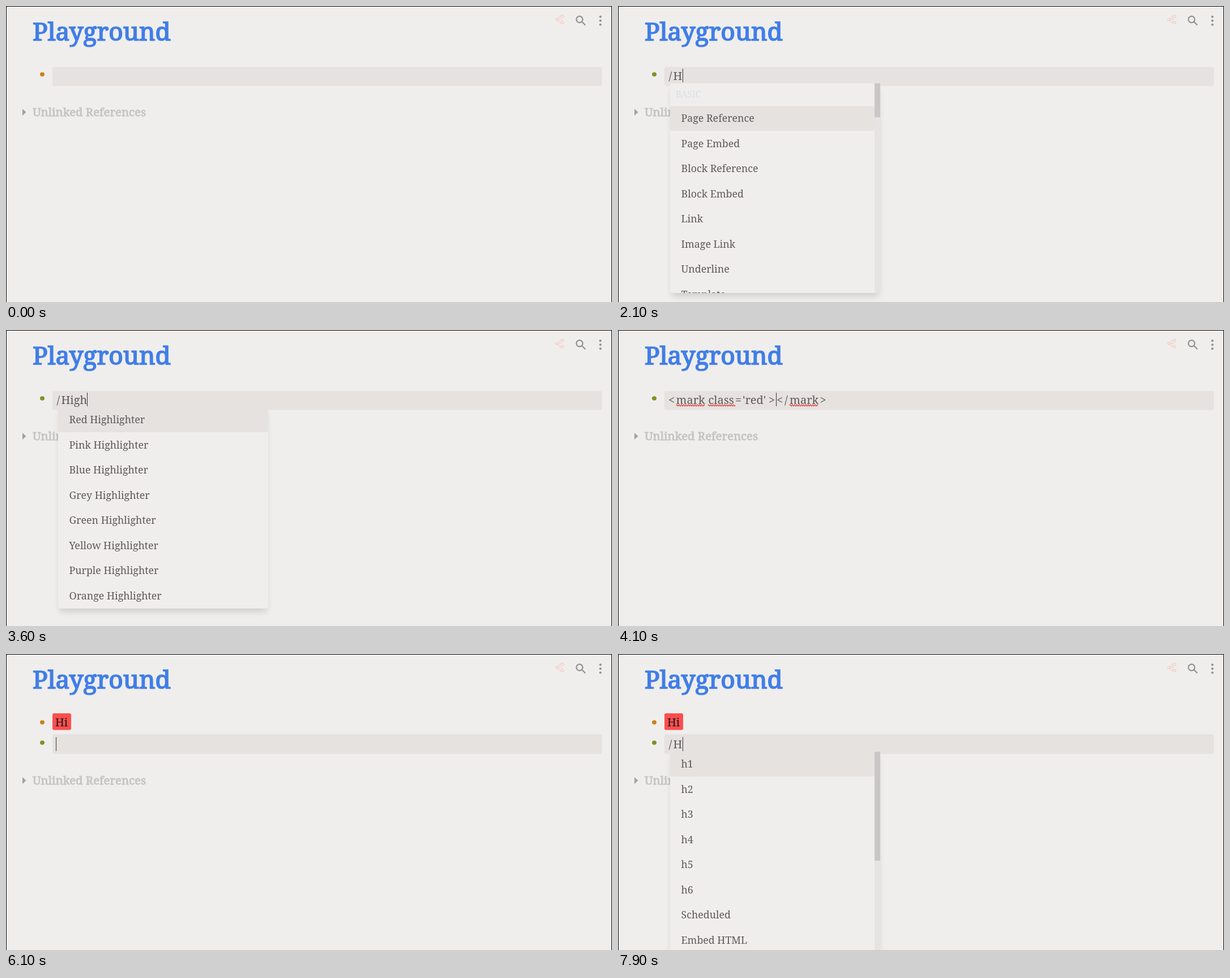
Recreate the animation shown at these times as an HTML page. Size 1070x524 px, loop 8000 ms.

```html
<!DOCTYPE html>
<html lang="en">
<head>
<meta charset="utf-8">
<title>Playground</title>
<style>
  html, body { margin: 0; height: 100%; overflow: hidden; background: #efeeec; }
  svg { display: block; }
  text { font: 20px "Noto Serif", serif; fill: #5f585a; white-space: pre; }
  .title { font-size: 44.3px; fill: #417ee8; stroke: #417ee8; stroke-width: 1.7; }
  .refs { font-size: 20.35px; fill: #c5c3c1; stroke: #c5c3c1; stroke-width: .8; }
  .item { font-size: 17.8px; }
  .head { font-size: 15.4px; fill: #d4dfe8; }
  .wave { fill: none; stroke: #e8302f; stroke-width: 1.2; }
  .shade { fill: #000; opacity: .13; filter: blur(6px); }
</style>
</head>
<body>
<svg id="stage" width="1070" height="524" viewBox="0 0 1070 524">
  <text class="title" x="47" y="61">Playground</text>
  <g fill="none" stroke="#f3d0c9" stroke-width="1.3">
    <circle cx="972.5" cy="24" r="2"/>
    <rect x="979.5" y="16.5" width="5.5" height="4" rx="2"/>
    <rect x="979.5" y="27.5" width="5.5" height="4" rx="2"/>
    <path d="M974 22.5L979.5 18.5M974.5 24H982M974 25.5L979.5 29.5"/>
  </g>
  <g fill="none" stroke="#92908e" stroke-width="2.2">
    <circle cx="1012.7" cy="23.7" r="5.6"/>
    <path d="M1016.8 27.8L1023 34"/>
  </g>
  <g fill="#92908e">
    <circle cx="1049.5" cy="19" r="2.1"/>
    <circle cx="1049.5" cy="26" r="2.1"/>
    <circle cx="1049.5" cy="33" r="2.1"/>
  </g>
  <g id="page"></g>
  <path d="M.5 524V.5H1069.5V524" fill="none" stroke="#000"/>
</svg>
<script>
const LOOP = 8000, ROW = 44.5, LINE = 36;
const colours = ["Red", "Pink", "Blue", "Grey", "Green", "Yellow", "Purple", "Orange"];
const menus = {
  basic: { head: "BASIC", height: 371, thumb: 60, items: ["Page Reference", "Page Embed",
    "Block Reference", "Block Embed", "Link", "Image Link", "Underline", "Template"] },
  h: { height: 371, thumb: 193, items: ["h1", "h2", "h3", "h4", "h5", "h6", "Scheduled", "Embed HTML"] },
  high: { height: 356, items: colours.map(c => c + " Highlighter") }
};

// start time, changes to the state
const steps = [
  [0, { line: 0, text: "", caret: 0, menu: "", idle: true, code: false, wavy: false }],
  [800, { caret: 88, idle: false }],
  [1300, { caret: 0 }],
  [1500, { text: "/", caret: 97, menu: "basic" }],
  [2000, { caret: 0 }],
  [2100, { text: "/H", caret: 114 }],
  [2200, { menu: "h" }],
  [2400, { text: "/Hi", caret: 120 }],
  [2500, { menu: "high" }],
  [2600, { text: "/High", caret: 143 }],
  [3100, { caret: 0 }],
  [3600, { caret: 143 }],
  [4000, { text: "", caret: 279, menu: "", code: true }],
  [4100, { wavy: true }],
  [4500, { caret: 0 }],
  [4800, { text: "H", caret: 294 }],
  [5000, { text: "Hi", caret: 301 }],
  [5500, { caret: 0 }],
  [5700, { caret: 397 }],
  [6100, { line: 1, text: "", caret: 88, code: false }],
  [6600, { caret: 0 }],
  [6900, { text: "/", caret: 97, menu: "basic" }],
  [7400, { caret: 0 }],
  [7800, { text: "/H", caret: 114 }],
  [7900, { menu: "h" }]
];

const esc = s => s.replace(/</g, "&lt;").replace(/>/g, "&gt;");
const text = (x, y, s, cls = "") => `<text x="${x}" y="${y}" class="${cls}">${esc(s)}</text>`;
const rect = (x, y, w, h, fill, r = 0) =>
  `<rect x="${x}" y="${y}" width="${w}" height="${h}" fill="${fill}" rx="${r}"/>`;
const bullet = (y, fill) => `<ellipse cx="64" cy="${y}" rx="4" ry="3.7" fill="${fill}"/>`;
const wave = (x, w) =>
  `<path class="wave" d="M${x} 133.5q1 -2.4 2 0${"t2 0".repeat(w / 2 - 1)}"/>`;

function codeLine(typed, wavy) {
  const shift = [0, 16, 23][typed.length];
  const parts = [[89, "<"], [102.5, "mark"], [159.5, "class"], [207, "="], [220, "'red'"], [266, ">"],
    [279, typed], [280 + shift, "<"], [294 + shift, "/"], [303 + shift, "mark"], [356.5 + shift, ">"]];
  return parts.map(([x, s]) => text(x, 131, s)).join("") +
    (wavy ? wave(103, 50) + wave(159, 48) + wave(303 + shift, 50) : "");
}

function menuBox({ head, height, thumb, items }, top) {
  const first = head ? 40 : 0, width = thumb ? 361 : 371;
  const rows = items.map((s, i) => text(19.5, first + i * ROW + 28, s, "item")).join("");
  return `<rect class="shade" x="95" y="${top + 10}" width="365" height="${height - 4}" rx="4"/>` +
    `<svg x="92" y="${top}" width="371" height="${height}">` +
    rect(0, -6, 371, height + 6, "#f0eeed", 5) +
    rect(0, first, width, ROW - .5, "#e6e2e0", 3) +
    (head ? text(10, 25, head, "head") : "") + rows +
    (thumb ? rect(361, 0, 10, height, "#e6e4e2") + rect(361, 0, 10, thumb, "#c9c7c5") : "") +
    "</svg>";
}

function draw({ line, text: typed, caret, menu, idle, code, wavy }) {
  const dy = line * LINE;
  let out = line ? bullet(121, "#c9821c") + rect(82, 105, 33, 29.5, "#fd4e4e", 3) +
    `<text x="87" y="128" style="fill:#1c1717">Hi</text>` : "";
  out += bullet(121 + dy, idle ? "#c9821c" : "#7d9422");
  out += line ? rect(82, 142, 970, 35, "#e5e2e0", 3) : rect(82, 108, 970, 33.5, "#e5e2e0", 3);
  out += code ? codeLine(typed, wavy)
    : text(89.5, 131 + dy, typed.slice(0, 1)) + text(97.5, 131 + dy, typed.slice(1));
  if (caret) out += rect(caret, 111 + dy, 1, line ? 25 : 24, "#3a3537");
  out += `<path d="M29 ${182 + dy}l6.5 6l-6.5 6z" fill="#a3a19f"/>` +
    text(47, 195 + dy, "Unlinked References", "refs");
  if (menu) out += menuBox(menus[menu], 137 + dy);
  return out;
}

const page = document.getElementById("page");
let shown = "";
function frame(now) {
  const t = now % LOOP;
  const state = Object.assign({}, ...steps.filter(s => s[0] <= t).map(s => s[1]));
  const html = draw(state);
  if (html !== shown) page.innerHTML = shown = html;
  requestAnimationFrame(frame);
}
frame(0);
</script>
</body>
</html>
```
